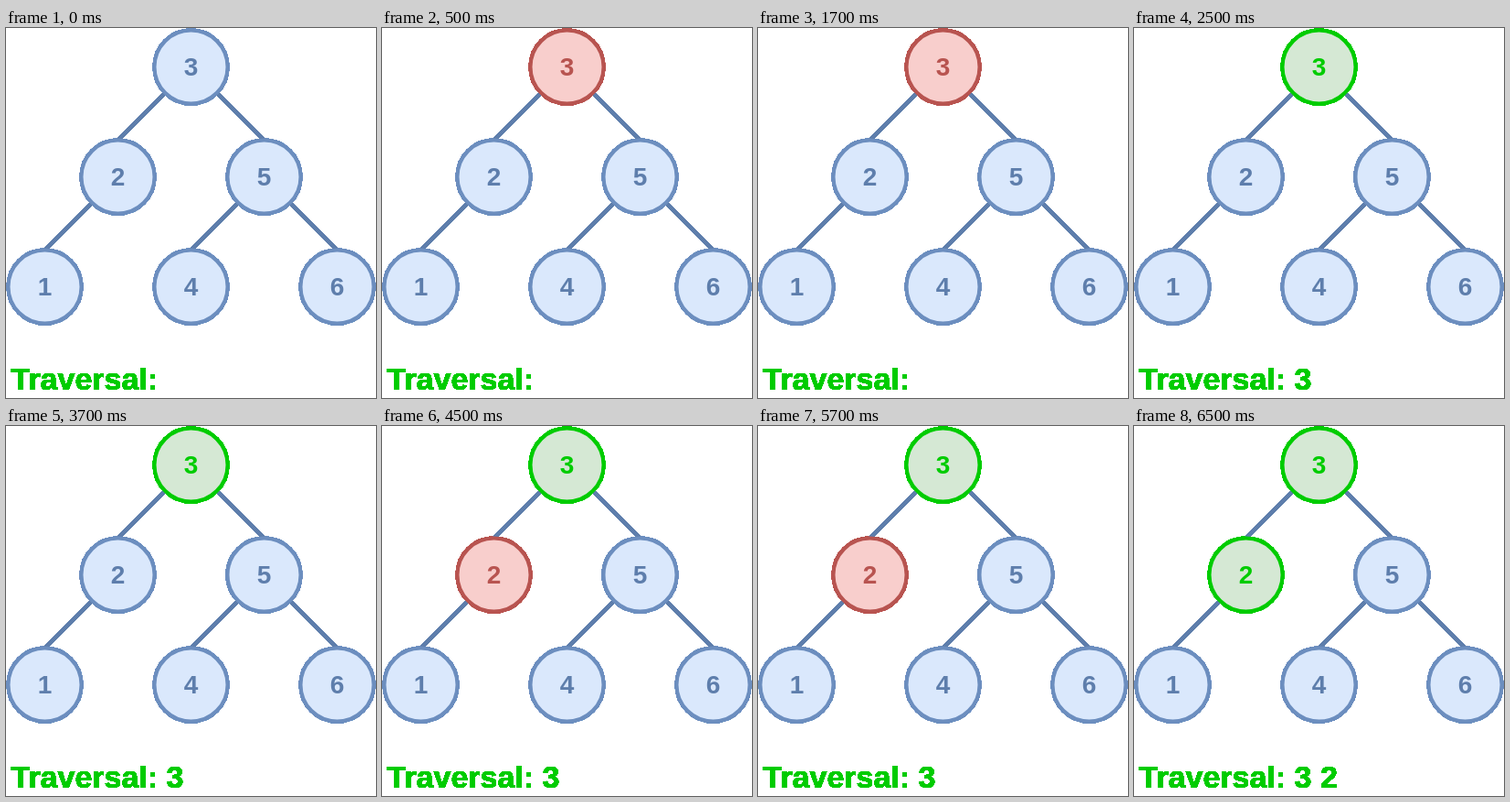
These frames come from a looping animation (405x404 px, 8 s). An HTML page:

```html
<!DOCTYPE html>
<html lang="en">
<head>
<meta charset="utf-8">
<title>Tree traversal</title>
<style>
  html, body { margin: 0; width: 100%; height: 100%; overflow: hidden; background: #fff; }
  svg { display: block; width: 405px; height: 404px; }
  text { font: bold 28px "Liberation Sans", Arial, sans-serif; }
  line { stroke: #5e7eac; stroke-width: 4; }
  circle { stroke-width: 4; }
  .idle circle { fill: #dae8fc; stroke: #6c8ebf; }
  .idle text { fill: #5e7eac; }
  .active circle { fill: #f8cecc; stroke: #b85450; }
  .active text { fill: #b85450; }
  .done circle { fill: #d5e8d4; stroke: #0c0; }
  .done text { fill: #0c0; }
  #output { font-size: 34px; fill: #0c0; }
</style>
</head>
<body>
<svg viewBox="0 0 405 404">
  <!-- Makes soft outer edges opaque -->
  <filter id="hard" filterUnits="userSpaceOnUse" x="0" y="0" width="405" height="404"
          color-interpolation-filters="sRGB">
    <feComponentTransfer><feFuncA type="linear" slope="20"/></feComponentTransfer>
  </filter>
  <g filter="url(#hard)">
    <g id="tree"></g>
    <text id="output" x="5.5" y="395"></text>
  </g>
</svg>
<script>
const LOOP = 8000, START = 500, STEP = 2000, R = 40;
const positions = {
  3: [202.5, 42.5], 2: [122.5, 162.5], 5: [282.5, 162.5],
  1: [42.5, 282.5], 4: [202.5, 282.5], 6: [362.5, 282.5]
};
const edges = [[3, 2], [3, 5], [2, 1], [5, 4], [5, 6]];
const order = [3, 2];
const tree = document.getElementById('tree');
const output = document.getElementById('output');
const nodes = {};

function add(parent, tag, attrs) {
  const el = document.createElementNS('http://www.w3.org/2000/svg', tag);
  for (const key in attrs) el.setAttribute(key, attrs[key]);
  return parent.appendChild(el);
}

for (const [from, to] of edges) {
  const [x, y] = positions[from], [x2, y2] = positions[to];
  const d = R * Math.SQRT1_2;
  add(tree, 'line', { x1: x + Math.sign(x2 - x) * d, y1: y + d, x2, y2: y2 - R });
}
for (const key in positions) {
  const [x, y] = positions[key];
  nodes[key] = add(tree, 'g', {});
  add(nodes[key], 'circle', { cx: x, cy: y, r: R });
  add(nodes[key], 'text', { x, y: y + 9.5, 'text-anchor': 'middle' }).textContent = key;
}

// Each visited node turns active, then done one step later.
function draw(now) {
  const step = Math.floor((now % LOOP - START) / STEP);
  for (const key in nodes) {
    const i = order.indexOf(+key);
    const state = i < 0 || step < 2 * i ? 'idle' : step === 2 * i ? 'active' : 'done';
    nodes[key].setAttribute('class', state);
  }
  const visited = order.filter((_, i) => step > 2 * i);
  output.textContent = ['Traversal:', ...visited].join(' ');
}

const begin = performance.now();
function tick() {
  draw(performance.now() - begin);
  requestAnimationFrame(tick);
}
tick();
</script>
</body>
</html>
```
